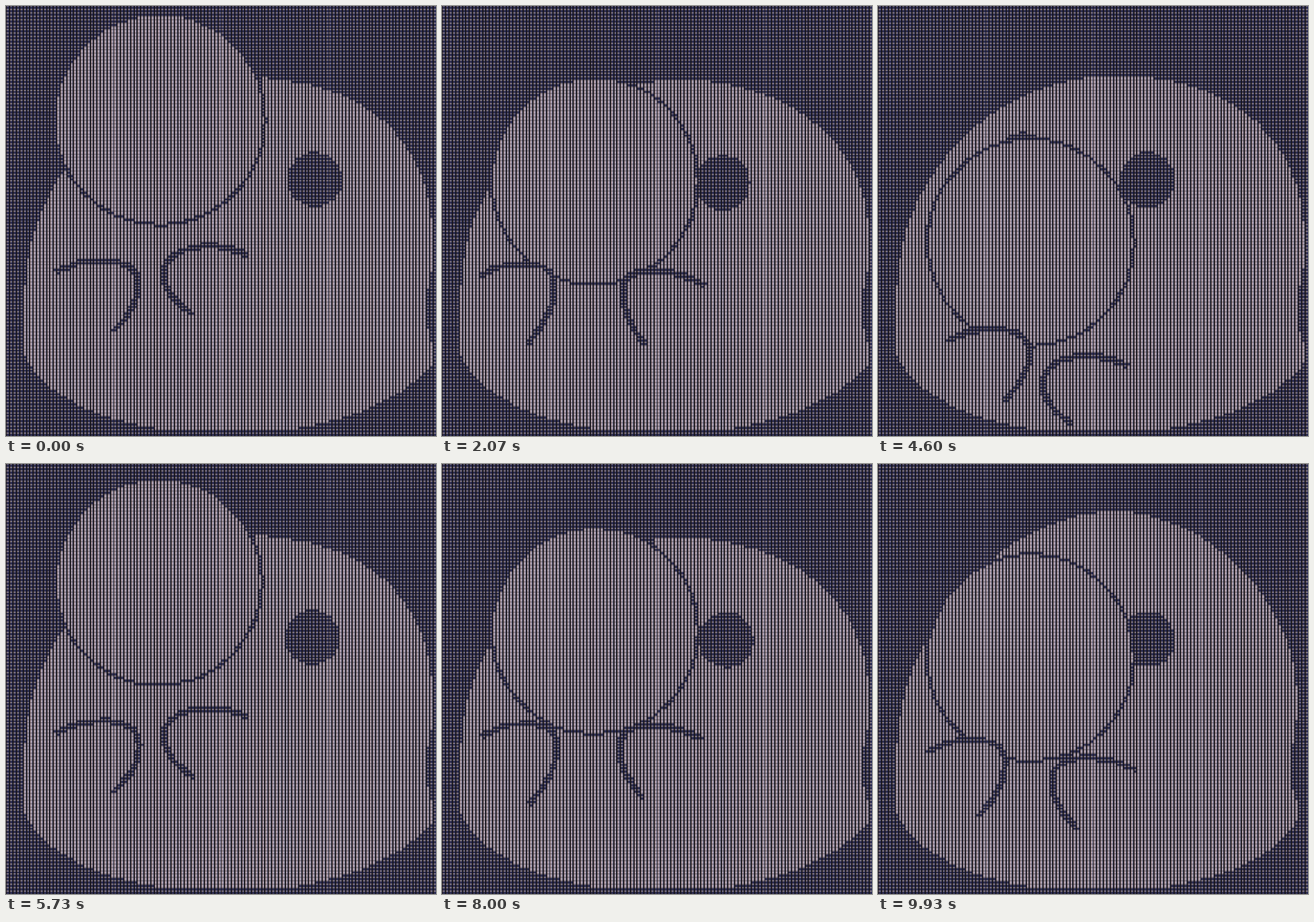
These frames come from a looping animation (748 px wide and 748 px high, 9.99 s). An HTML page with a canvas:

```html
<!DOCTYPE html>
<html lang="en">
<head>
<meta charset="utf-8">
<title>Blob toss</title>
<style>
  html, body { margin: 0; height: 100%; overflow: hidden; background: #16141c; }
  canvas { display: block; }
</style>
</head>
<body>
<canvas id="stage" width="748" height="748"></canvas>
<script>
const SIZE = 748, CELLS = 128, CELL_PX = 6;
const LOOP = 9990, CYCLE = 6000, FPS = 15;

// Each hand runs tip, bend, end. Every point has a resting place and a shift
// for the catch; "crouch" moves the whole hand.
const leftHand = {
  rest: [[88, 460], [230, 482], [186, 564]],
  grab: [[-46, 11], [-82, 4], [-88, 46]],
  crouch: [36, 121]
};
const rightHand = {
  rest: [[418, 430], [273, 465], [323, 533]],
  grab: [[87, 126], [95, 72], [64, 122]],
  crouch: [10, 190]
};

// Smooth pulse that peaks at one moment of the cycle.
function pulse(t, peak, width) {
  const half = CYCLE / 2;
  const distance = (t - peak + CYCLE + half) % CYCLE - half;
  return Math.exp(-((distance / width) ** 2));
}

function poseAt(t) {
  return {
    near: pulse(t, 700, 350),
    low: pulse(t, 2900, 900),
    stretch: pulse(t, 3930, 400),
    crouch: pulse(t, 4600, 650),
    pat: 28 * Math.sin((2900 - t) * Math.PI / 400)
  };
}

function makeLayer(size) {
  const canvas = document.createElement('canvas');
  canvas.width = canvas.height = size;
  return canvas.getContext('2d', { willReadFrequently: size === CELLS });
}

// Fills a layer from a colour rule over the pixels inside one cell.
function makeTexture(colorAt) {
  const g = makeLayer(SIZE);
  const inCell = v => Math.floor(v * CELLS * CELL_PX / SIZE) % CELL_PX;
  for (let y = 0; y < SIZE; y++) {
    for (let x = 0; x < SIZE; x++) {
      g.fillStyle = colorAt(inCell(x), inCell(y));
      g.fillRect(x, y, 1, 1);
    }
  }
  return g.canvas;
}

const isGap = v => v === 0 || v === CELL_PX - 1;

// Bright stripes run through every row; unlit cells are dark squares on them.
const stripes = makeTexture((x, y) => {
  if (isGap(x)) return '#16141c';
  const dim = isGap(y) ? 0.76 : 1;
  return `rgb(${(178 - x * 6) * dim}, ${150 * dim}, ${(150 + x * 6) * dim})`;
});
const squares = makeTexture((x, y) =>
  isGap(x) || isGap(y) ? 'transparent' : `rgb(${56 - x * 3}, 48, ${60 + x * 8})`);

const out = document.getElementById('stage').getContext('2d');
const mask = makeLayer(CELLS);
const shade = makeLayer(SIZE);
shade.imageSmoothingEnabled = false;
mask.scale(CELLS / SIZE, CELLS / SIZE);
mask.lineCap = mask.lineJoin = 'round';
mask.strokeStyle = '#000';

function ellipse(x, y, rx, ry, color) {
  mask.beginPath();
  mask.ellipse(x, y, rx, ry, 0, 0, 2 * Math.PI);
  mask.fillStyle = color;
  mask.fill();
}

function drawBody({ low, stretch, crouch }) {
  const top = 124 - 44 * stretch + 12 * low;
  const right = 742 - 13 * stretch;
  const shoulder = 570 + 60 * Math.max(0, 1 - low - stretch);
  mask.fillStyle = '#fff';
  mask.fill(new Path2D(`M32 610 C28 560 28 500 38 440 C70 250 230 ${top} 415 ${top}
    C${shoulder} ${top} ${right} 240 ${right} 400 L${right - 2} 460
    Q${right - 24} 530 ${right} 590 V620 C690 690 560 737 460 737
    H280 C180 720 80 690 32 610Z`));

  const eyeX = 538 - 70 * Math.min(1, 1.7 * (low + crouch));
  const eyeY = 302 + 12 * low;
  ellipse(eyeX - 216, eyeY - 34, 49, 50, '#000');
  ellipse(eyeX, eyeY, 48, 49, '#000');
}

function drawDisc({ near, low, crouch }) {
  const r = 180 + 205 * near;
  ellipse(265 + 100 * near, 195 + 257 * low + 209 * crouch, r, r, '#fff');
  mask.lineWidth = 6;
  mask.stroke();
}

function drawHand({ rest, grab, crouch }, pose, lift) {
  const [[x, y], [bendX, bendY], [endX, endY]] = rest.map((point, i) =>
    point.map((v, axis) => v + pose.low * (grab[i][axis] + axis * lift) + pose.crouch * crouch[axis]));
  const hand = new Path2D(`M${x} ${y}
    C${x + (bendX - x) * 0.4} ${y - 30} ${bendX} ${bendY - 49} ${bendX} ${bendY}
    Q${bendX} ${(bendY + endY) / 2} ${endX} ${endY}`);
  mask.fillStyle = '#fff';
  mask.fill(hand);
  mask.lineWidth = 11;
  mask.stroke(hand);
}

function draw(t) {
  const pose = poseAt(t);
  mask.fillStyle = '#000';
  mask.fillRect(0, 0, SIZE, SIZE);
  drawBody(pose);
  drawDisc(pose);
  drawHand(leftHand, pose, pose.pat);
  drawHand(rightHand, pose, 0);

  // Every cell is either lit or unlit; keep only the unlit ones.
  const image = mask.getImageData(0, 0, CELLS, CELLS);
  for (let i = 0; i < image.data.length; i += 4) {
    image.data[i + 3] = image.data[i] > 127 ? 0 : 255;
  }
  mask.putImageData(image, 0, 0);

  shade.globalCompositeOperation = 'copy';
  shade.drawImage(mask.canvas, 0, 0, SIZE, SIZE);
  shade.globalCompositeOperation = 'source-in';
  shade.drawImage(squares, 0, 0);
  out.drawImage(stripes, 0, 0);
  out.drawImage(shade.canvas, 0, 0);
}

function tick() {
  const step = Math.floor((performance.now() % LOOP + 10) * FPS / 1000);
  draw(step * 1000 / FPS % CYCLE);
  requestAnimationFrame(tick);
}
tick();
</script>
</body>
</html>
```
